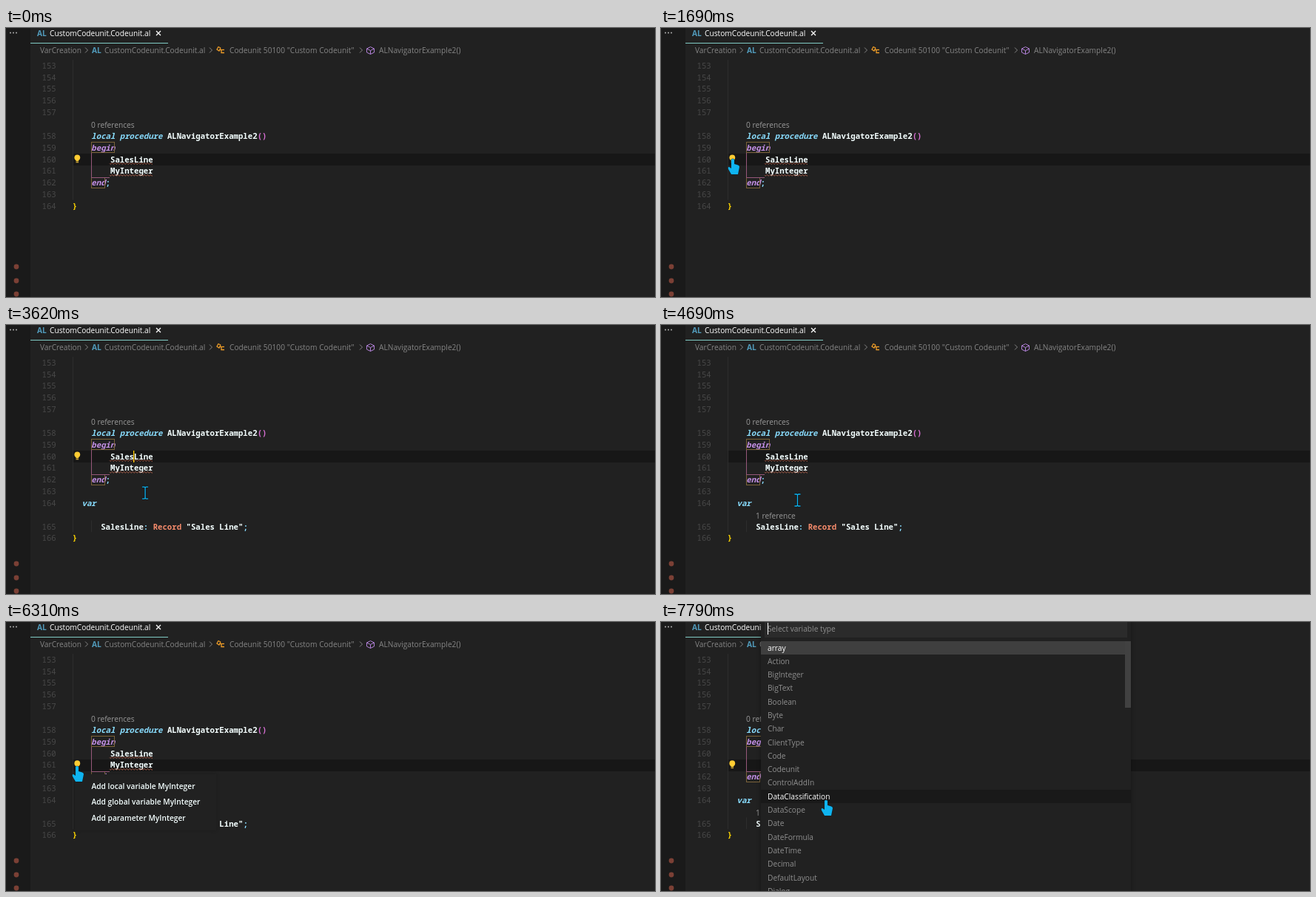
An HTML page with a canvas that plays this animation: 877 px wide and 364 px high, repeating every 8 s.

```html
<!DOCTYPE html>
<html lang="en">
<head>
<meta charset="utf-8">
<title>Editor quick fix</title>
<style>
html, body { margin: 0; width: 100%; height: 100%; overflow: hidden; background: #212121; }
canvas { display: block; }
</style>
</head>
<body>
<canvas id="stage" width="877" height="364"></canvas>
<script>
const ctx = document.getElementById('stage').getContext('2d');
const LOOP = 8000;
const CHAR = 6.41, LEFT = 89.7, LINE = 15.85;
const UI = '10.2px "Open Sans", sans-serif';
const MONO = '10.68px "Noto Sans Mono", monospace';
const BG = '#212121', WHITE = '#f4ffff', CYAN = '#89ddff', PURPLE = '#c792ea',
  PINK = '#da70d6', GOLD = '#ffd700', CORAL = '#f78c6c', TEAL = '#80cbc4',
  GREY = '#858585', GUIDE = '#2d2d2d', POINTER = '#0fb4f0';

// Moments at which the editor state changes
const CLICK_1 = 760, MENU_1 = 1700, CHOOSE_1 = 3070, INSERT = 3150, LENS_GAP = 3620,
  LENS = 4000, CLICK_2 = 5310, BULB_2 = 5580, MENU_2 = 6310, CHOOSE_2 = 7560,
  PICK = 7640, PICK_HOVER = 7710;

// Pointer path: time, x, y
const path = [
  [70, 394, 227], [150, 250, 161], [260, 250, 161], [610, 172, 177], [910, 172, 177],
  [1070, 141, 177], [1540, 97, 177], [1760, 97, 177], [2380, 180, 210], [2450, 187, 222],
  [2610, 188, 227], [3620, 188, 227], [4000, 222, 262], [4390, 228, 280], [4950, 147, 200],
  [5230, 170, 193], [5400, 170, 193], [5690, 131, 197], [6230, 96, 195], [6640, 96, 195],
  [6860, 185, 226], [7010, 223, 241]
];

const types = ['array', 'Action', 'BigInteger', 'BigText', 'Boolean', 'Byte', 'Char',
  'ClientType', 'Code', 'Codeunit', 'ControlAddIn', 'DataClassification', 'DataScope',
  'Date', 'DateFormula', 'DateTime', 'Decimal', 'DefaultLayout', 'Dialog'];

const rowY = i => 50.5 + LINE * i;

function rect(x, y, w, h, color) {
  ctx.fillStyle = color;
  ctx.fillRect(x, y, w, h);
}

function stroke(points, color, width = 1) {
  ctx.strokeStyle = color;
  ctx.lineWidth = width;
  ctx.beginPath();
  points.forEach(([x, y]) => ctx.lineTo(x, y));
  ctx.stroke();
}

function dot(x, y, r, color) {
  ctx.fillStyle = color;
  ctx.beginPath();
  ctx.arc(x, y, r, 0, 7);
  ctx.fill();
}

function text(str, x, y, color, font = UI) {
  ctx.font = font;
  ctx.fillStyle = color;
  ctx.fillText(str, x, Math.round(y + 3.6));
}

// Each part is [text, colour, italic?]
function code(row, col, ...parts) {
  for (const [str, color, italic] of parts) {
    text(str, LEFT + col * CHAR, rowY(row) + 0.6, color, (italic ? 'italic 600 ' : '600 ') + MONO);
    col += str.length;
  }
}

function lineNumber(n, row) {
  text(n, 48.5, rowY(row) + 0.6, '#484848', MONO);
}

function squiggle(row) {
  const points = [];
  for (let x = 140; x <= 198; x++) points.push([x, rowY(row) + 6.2 + Math.sin(x * 1.57)]);
  stroke(points, '#a35a46');
}

function chevron(x) {
  stroke([[x - 2, 26.5], [x + 1.5, 30], [x - 2, 33.5]], GREY);
}

function drawFrame() {
  rect(0, 0, 877, 364, BG);
  rect(0, 0, 33, 364, '#1a1a1a');
  for (const x of [6, 10, 14]) dot(x, 6.5, 0.9, '#c0c0c0');
  for (const y of [323, 342, 360]) dot(14, y, 3.4, '#7b4035');

  text('AL', 42, 7, '#519aba', 'bold ' + UI);
  text('CustomCodeunit.Codeunit.al', 59, 7, '#ffffff', '500 ' + UI);
  stroke([[203, 4], [209, 10]], '#ffffff', 1.3);
  stroke([[209, 4], [203, 10]], '#ffffff', 1.3);
  rect(33, 20, 186, 1, TEAL);

  text('VarCreation', 46, 30, GREY);
  chevron(109);
  text('AL', 116, 30, '#519aba', 'bold ' + UI);
  text('CustomCodeunit.Codeunit.al', 133, 30, GREY);
  chevron(277);
  stroke([[290, 27], [287, 25.5], [285, 29], [288, 31], [290, 27]], '#ee9d28', 1.3);
  stroke([[289, 29.5], [295, 29.5]], '#ee9d28', 1.3);
  stroke([[291, 30], [291, 33.5], [295, 33.5]], '#ee9d28', 1.3);
  text('Codeunit 50100 "Custom Codeunit"', 302, 30, GREY);
  chevron(480);
  stroke([[487.5, 28], [492.5, 25.5], [497.5, 28], [497.5, 33], [492.5, 35.5], [487.5, 33],
    [487.5, 28], [492.5, 30.5], [497.5, 28]], '#b180d7');
  stroke([[492.5, 30.5], [492.5, 35.5]], '#b180d7');
  text('ALNavigatorExample2()', 504, 30, GREY);
}

function drawBulb(y) {
  dot(96.3, y - 2, 3.9, '#ffcc33');
  rect(94.5, y, 3.6, 3, '#ffcc33');
  rect(94.5, y + 3.5, 3.6, 1.5, '#c9a23a');
}

function drawCode(t) {
  const inserted = t >= INSERT, gap = t >= LENS_GAP ? 1 : 0;
  const caretRow = t < CLICK_2 ? 8 : 9;
  const lastRow = inserted ? 14 + gap : 12;
  const caretTop = Math.round(rowY(caretRow) - 7.5);

  rect(LEFT, caretTop, 877 - LEFT, 16, '#171717');
  rect(90, 43, 1, rowY(lastRow) - 51, GUIDE);
  for (let i = 0; i < 5; i++) lineNumber(153 + i, i);
  for (let i = 6; i < 13; i++) lineNumber(152 + i, i);

  text('0 references', 115, 131, '#999999');
  code(6, 4, ['local procedure ', CYAN, 1], ['ALNavigatorExample2', WHITE], ['()', PINK]);
  code(7, 4, ['begin', PURPLE, 1]);
  code(8, 8, ['SalesLine', WHITE]);
  code(9, 8, ['MyInteger', WHITE]);
  code(10, 4, ['end', PURPLE, 1], [';', CYAN]);
  squiggle(8);
  squiggle(9);

  ctx.strokeStyle = '#7a6238';
  ctx.lineWidth = 1;
  ctx.strokeRect(115.5, 154.5, 31, 14);
  ctx.strokeRect(115.5, 202.5, 18, 14);
  stroke([[115.5, 169], [115.5, 202.5], [140, 202.5]], '#96587a');

  if (inserted) {
    const row = 13 + gap;
    code(12, 2, ['var', CYAN, 1]);
    lineNumber(165, row);
    lineNumber(166, row + 1);
    rect(115, rowY(row) - 8, 1, LINE, GUIDE);
    code(row, 6, ['SalesLine', WHITE], [':', CYAN], [' Record', CORAL],
      [' "Sales Line"', WHITE], [';', CYAN]);
    if (t >= LENS) text('1 reference', 128, 258, '#999999');
  }
  code(lastRow, 0, ['}', GOLD]);

  if (t < LENS) drawBulb(rowY(8));
  else if (t >= BULB_2) drawBulb(rowY(9));

  const focused = t >= CLICK_1 && t < MENU_1 || t >= CHOOSE_1 && t < MENU_2;
  const since = t < MENU_1 ? CLICK_1 : t < INSERT ? CHOOSE_1 : t < CLICK_2 ? INSERT : CLICK_2;
  if (focused && (t - since) % 1000 < 500) rect(172, caretTop, 1.3, 16, '#ffcc00');
}

function drawMenu(x, y, w, name, mouse) {
  ctx.save();
  ctx.shadowColor = 'rgba(0,0,0,.2)';
  ctx.shadowBlur = 5;
  rect(x, y, w, 76, BG);
  ctx.restore();
  ['local variable', 'global variable', 'parameter'].forEach((kind, i) => {
    const top = y + 5.5 + i * 21.6;
    const hover = mouse.x > x + 5 && mouse.y >= top && mouse.y < top + 21.6;
    if (hover) rect(x, Math.round(top), w, 21, '#171717');
    text(`Add ${kind} ${name}`, x + 22.5, top + 10.7, hover ? TEAL : WHITE, '600 ' + UI);
  });
}

function drawPicker(t) {
  ctx.save();
  ctx.shadowColor = 'rgba(0,0,0,.35)';
  ctx.shadowBlur = 6;
  rect(135, -10, 500, 390, BG);
  ctx.restore();
  rect(140, 0, 490, 21, '#2b2b2b');
  text('Select variable type', 144, 9, '#8f8f8f');
  rect(144, 1, 1, 16, '#ffffff');
  types.forEach((type, i) => {
    const y = 35 + i * 18.29, hover = i === 11 && t >= PICK_HOVER;
    if (i === 0) rect(135, 26, 492, 18, '#3f3f3f');
    if (hover) rect(135, Math.round(y - 9), 500, 18, '#191919');
    const active = i === 0 || hover;
    text(type, 144, y, active ? '#ffffff' : '#8f8f8f', (active ? '500 ' : '') + UI);
  });
  rect(627, 26, 8, 90, '#414141');
}

function mouseAt(t) {
  const next = path.findIndex(p => p[0] > t);
  if (next < 0) return { x: 223, y: 241 };
  const [t0, x0, y0] = path[next - 1], [t1, x1, y1] = path[next];
  const k = (t - t0) / (t1 - t0);
  return { x: x0 + (x1 - x0) * k, y: y0 + (y1 - y0) * k };
}

const hand = new Path2D('M-2 1Q0-1 2 1V7L7 8.5Q9 9 9 11L8 16 7 21H-2L-6 14Q-7 11-5 11L-2 13Z');
const beam = new Path2D('M-4-8H-1L0-7 1-8H4M0-7V7M-4 8H-1L0 7 1 8H4');

function drawMouse(t, { x, y }) {
  const overMenu = t >= MENU_1 && t < CHOOSE_1 || t >= MENU_2;
  ctx.save();
  ctx.translate(x, y);
  if (overMenu || x < 103) {
    ctx.strokeStyle = '#102028';
    ctx.lineWidth = 1;
    ctx.stroke(hand);
    ctx.fillStyle = POINTER;
    ctx.fill(hand);
  } else {
    ctx.strokeStyle = '#101418';
    ctx.lineWidth = 3;
    ctx.stroke(beam);
    ctx.strokeStyle = POINTER;
    ctx.lineWidth = 1.3;
    ctx.stroke(beam);
  }
  ctx.restore();
}

function draw(now) {
  const t = now % LOOP;
  const mouse = t >= path[0][0] ? mouseAt(t) : null;
  drawFrame();
  drawCode(t);
  if (t >= MENU_1 && t < CHOOSE_1) drawMenu(98, 190, 184, 'SalesLine', mouse);
  if (t >= MENU_2 && t < CHOOSE_2) drawMenu(93, 206, 191, 'MyInteger', mouse);
  if (t >= PICK) drawPicker(t);
  if (mouse) drawMouse(t, mouse);
}

const start = performance.now();
function tick() {
  draw(performance.now() - start);
  requestAnimationFrame(tick);
}
tick();
</script>
</body>
</html>
```
